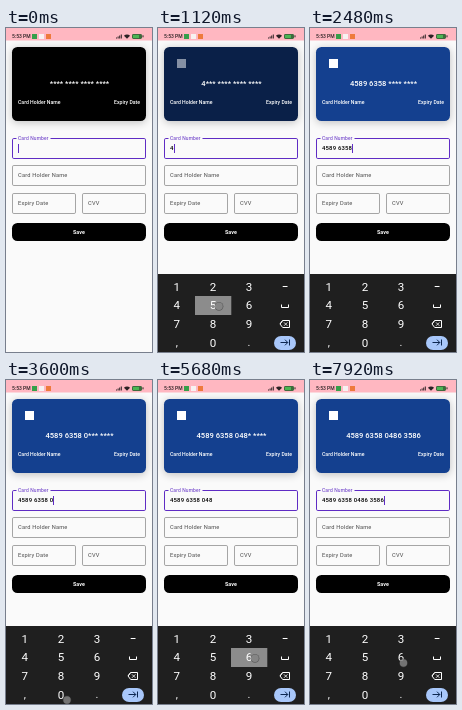
An HTML page with a canvas for the animation above (8 s loop, 146 by 324 pixels).

```html
<!DOCTYPE html>
<html lang="en">
<head>
<meta charset="utf-8">
<title>Card form</title>
<style>
html, body { margin: 0; width: 100%; height: 100%; overflow: hidden; background: #fafafa; }
canvas { display: block; width: 146px; height: 324px; }
</style>
</head>
<body>
<canvas id="stage"></canvas>
<script>
const W = 146, H = 324, LOOP = 8000;
const canvas = document.getElementById('stage');
const dpr = window.devicePixelRatio || 1;
canvas.width = Math.round(W * dpr);
canvas.height = Math.round(H * dpr);
const c = canvas.getContext('2d');

const DIGITS = '4589635804863586';
const TYPED = [920, 1200, 1480, 1700, 1920, 2080, 2230, 2380,
               3580, 4700, 5100, 5740, 6100, 6440, 6640, 6920];
const COLS = [18.8, 55, 91, 127], ROWS = [258.5, 277.3, 296.2, 315];
const PURPLE = '#5f2cc4', PAGE = '#fafafa';
const PRESS = 110, LINGER = 80;

const clamp = v => Math.max(0, Math.min(1, v));
const easeOut = v => 1 - (1 - clamp(v)) ** 3;

function text(s, x, y, size, color, { weight = 400, align = 'left', gap = 0 } = {}) {
  c.font = `${weight} ${size}px Roboto, sans-serif`;
  c.letterSpacing = gap + 'px';
  c.textAlign = align;
  c.fillStyle = color;
  c.fillText(s, x, y);
  return c.measureText(s).width;
}

function rect(x, y, w, h, color) {
  c.fillStyle = color;
  c.fillRect(x, y, w, h);
}

function panel(x, y, w, h, r, color) {
  c.beginPath();
  c.roundRect(x, y, w, h, r);
  c.fillStyle = color;
  c.fill();
}

// Outline centred on half pixels so that its edges stay crisp.
function outline(x, y, w, h, color, width) {
  c.beginPath();
  c.roundRect(x + 0.5, y + 0.5, w - 1, h - 1, 1.3);
  c.strokeStyle = color;
  c.lineWidth = width;
  c.stroke();
}

function dot(x, y, r, color) {
  c.beginPath();
  c.arc(x, y, r, 0, Math.PI * 2);
  c.fillStyle = color;
  c.fill();
}

function line(points, color, width) {
  c.beginPath();
  points.forEach(([x, y], i) => i ? c.lineTo(x, y) : c.moveTo(x, y));
  c.strokeStyle = color;
  c.lineWidth = width;
  c.stroke();
}

const group = s => s.replace(/(.{4})(?=.)/g, '$1 ');

function statusBar() {
  const ink = '#2c2224';
  rect(0, 0, W, 12.5, '#ffb7c1');
  text('5:53 PM', 6, 10, 5, ink, { weight: 500 });
  rect(26, 6, 5, 5, '#35a04a');
  rect(33, 6, 5, 5, '#f7f2f2');
  rect(40, 6, 5, 5, '#ee7a3c');
  for (let i = 0; i < 4; i++) rect(110 + i * 1.6, 9.5 - i, 1, 1 + i, ink);
  c.beginPath();
  c.moveTo(121, 10.7);
  c.arc(121, 10.7, 4.3, Math.PI * 1.25, Math.PI * 1.75);
  c.closePath();
  c.fillStyle = ink;
  c.fill();
  panel(126, 6, 10, 5, 1.4, '#3d6b3d');
  rect(127, 7, 6, 3, '#4bb553');
  rect(136.5, 7.3, 1, 2, ink);
}

function card(t, typed) {
  const k = clamp((t - 960) / 320);
  const mix = [20, 64, 143].map(v => Math.round(v * k));
  c.save();
  c.shadowColor = 'rgba(0,0,0,.24)';
  c.shadowBlur = 8 * dpr;
  c.shadowOffsetY = 1.5 * dpr;
  panel(6, 19, 134, 74, 5.5, `rgb(${mix})`);
  c.restore();
  c.globalAlpha = k;
  rect(19, 31, 9, 9, '#fff');
  c.globalAlpha = 1;
  text(group(typed.padEnd(16, '*')), 73.5, 58.2, 7.6, '#fff', { weight: 500, align: 'center' });
  text('Card Holder Name', 12, 75.8, 5.15, '#fff', { weight: 500 });
  text('Expiry Date', 134, 75.8, 5.15, '#fff', { weight: 500, align: 'right' });
}

function field(x, y, w, hint) {
  outline(x, y, w, 21, '#777', 0.65);
  text(hint, x + 6, y + 12.3, 5.7, '#4a4a4a', { gap: 0.18 });
}

function form(typed, cursor) {
  outline(6, 110, 134, 21, PURPLE, 1);
  rect(10.5, 109, 34, 3, PAGE);
  text('Card Number', 12, 111.7, 4.9, PURPLE, { gap: 0.15 });
  const w = text(group(typed), 12, 122.2, 5.95, '#000', { weight: 500, gap: 0.186 });
  if (cursor) rect(12 + Math.round(typed ? w : 0), 116, 1, 9, PURPLE);

  field(6, 137, 134, 'Card Holder Name');
  field(6, 165, 64, 'Expiry Date');
  field(76, 165, 64, 'CVV');

  panel(6, 195, 134, 18, 5.5, '#000');
  text('Save', 73, 205.9, 5.3, '#fff', { weight: 600, align: 'center', gap: 0.1 });
}

const keyPos = d => d === '0'
  ? [COLS[1], ROWS[3]]
  : [COLS[(d - 1) % 3], ROWS[Math.floor((d - 1) / 3)]];

function keyboard(t) {
  const shift = 78 * (1 - easeOut((t - 80) / 300));
  c.save();
  c.translate(0, shift);
  rect(0, 246, W, 79, '#1f1f1f');

  TYPED.forEach((at, i) => {
    if (t < at - PRESS || t >= at) return;
    const [x, y] = keyPos(DIGITS[i]);
    rect(x - 18, y - 9.3, 36.3, 19, '#8c8c8c');
  });

  const ink = '#fff';
  for (const d of '1234567890') {
    const [x, y] = keyPos(d);
    text(d, x, y + 4, 11.6, ink, { align: 'center' });
  }
  text(',', COLS[0], ROWS[3] + 3, 11, ink, { align: 'center' });
  text('.', COLS[2], ROWS[3] + 3, 11, ink, { align: 'center' });

  line([[124.7, 258.5], [129.5, 258.5]], ink, 1);
  line([[123.5, 276.5], [123.5, 279.5], [130.5, 279.5], [130.5, 276.5]], ink, 1);
  line([[122, 296], [124.7, 292.5], [131.5, 292.5], [131.5, 299.5],
        [124.7, 299.5], [122, 296], [124.7, 292.5]], ink, 1);
  line([[126, 294.4], [129.4, 297.8]], ink, 0.8);
  line([[129.4, 294.4], [126, 297.8]], ink, 0.8);

  const dark = '#0c2650';
  panel(116, 308, 22, 14, 7, '#a8c7fa');
  line([[122.5, 314.5], [129.8, 314.5]], dark, 1);
  line([[127, 311.7], [129.8, 314.5], [127, 317.3]], dark, 1);
  line([[131.5, 311.5], [131.5, 317.5]], dark, 1);
  c.restore();
}

function touch(x, y) {
  dot(x, y, 4.4, 'rgba(60,60,60,.6)');
  dot(x, y, 3.7, 'rgba(160,160,160,.6)');
}

function touches(t) {
  TYPED.forEach((at, i) => {
    if (t < at - PRESS || t >= at + LINGER) return;
    const [x, y] = keyPos(DIGITS[i]);
    touch(x + 6, y + (DIGITS[i] === '0' ? 5 : 1));
  });
  if (t >= 7840) touch(93.5, 283);
}

function draw(t) {
  const n = TYPED.filter(at => t >= at).length;
  const typed = DIGITS.slice(0, n);
  const since = t - (n ? TYPED[n - 1] : -100);
  const cursor = Math.floor(since / 500) % 2 === 0;

  c.setTransform(dpr, 0, 0, dpr, 0, 0);
  rect(0, 0, W, H, PAGE);
  statusBar();
  card(t, typed);
  form(typed, cursor);
  if (t >= 80) keyboard(t);
  touches(t);
}

const start = performance.now();
function tick(now) {
  draw(Math.max(0, now - start) % LOOP);
  requestAnimationFrame(tick);
}
draw(0);
requestAnimationFrame(tick);
</script>
</body>
</html>
```
